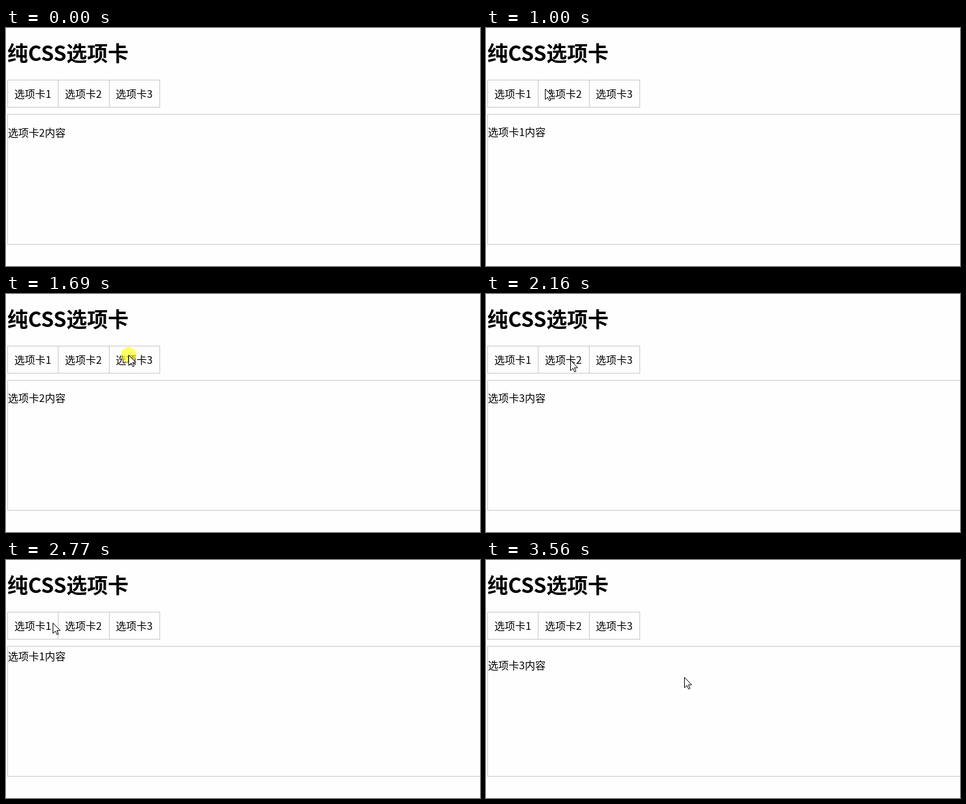
Animation of 732 by 368 pixels, one loop 3.65 s. Source, as an HTML page:

```html
<!DOCTYPE html>
<html lang="zh-CN">
<head>
<meta charset="utf-8">
<title>纯CSS选项卡</title>
<style>
  html, body { margin: 0; width: 100%; height: 100%; overflow: hidden; background: #fefefe; }
  svg { display: block; width: 732px; height: 368px; }
  text { font: 16px "Noto Sans CJK SC", "Noto Sans CJK", sans-serif; fill: #000; }
  .title { font-size: 32px; font-weight: 700; }
  .line { fill: none; stroke: #c8c8c8; shape-rendering: crispEdges; }
  .glow { fill: #ff0; opacity: .6; }
  .arrow { fill: #fff; stroke: #000; stroke-linejoin: round; }
</style>
</head>
<body>
<svg viewBox="0 0 732 368">
  <defs>
    <clipPath id="view"><rect x="3" y="134" width="729" height="200"/></clipPath>
  </defs>
  <text class="title" x="2" y="51">纯CSS选项卡</text>
  <path class="line" d="M2.5 80.5H237.5V122.5H2.5ZM80.5 80V123M159.5 80V123"/>
  <text x="13" y="108">选项卡1</text>
  <text x="91" y="108">选项卡2</text>
  <text x="169.5" y="108">选项卡3</text>
  <path class="line" d="M733 133.5H2.5V334.5H733"/>
  <g clip-path="url(#view)">
    <g id="panels">
      <text x="3" y="167">选项卡1内容</text>
      <text x="3" y="367">选项卡2内容</text>
      <text x="3" y="567">选项卡3内容</text>
    </g>
  </g>
  <g id="cursor">
    <circle id="glow" class="glow" r="12"/>
    <path class="arrow" d="M.5 .5V16.5L4.3 13L6.8 18.5L9 17.5L6.6 12H11.7Z"/>
  </g>
</svg>
<script>
  const LOOP = 3650, STEP = 77.3, LAST = 46;
  const $ = id => document.getElementById(id);
  const panels = $('panels'), cursor = $('cursor'), glow = $('glow');

  // [start ms, from, to] of each smooth scroll
  const scrolls = [
    [735, 199, 0], [1291, 0, 200], [1755, 200, 400],
    [2295, 400, 200], [2587, 200, 0], [3240, 0, 400]
  ];
  // [ms, x, y] of the pointer tip
  const path = [
    [77, 482, 268], [464, 18, 76], [541, 37, 94], [773, 37, 94],
    [1005, 91, 94], [1160, 137, 94], [1314, 137, 94], [1546, 189, 94],
    [1778, 189, 94], [2164, 130, 102], [2319, 130, 102], [2551, 42, 96],
    [2706, 42, 96], [3092, 193, 99], [3247, 193, 99], [3556, 306, 181]
  ];
  // [first step, end step) of each press
  const presses = [[8, 10], [16, 17], [22, 23], [29, 30], [33, 34], [41, 42]];

  const mix = (a, b, k) => a + (b - a) * k;

  // cubic-bezier(.42, 0, .58, 1)
  function easeInOut(x) {
    let lo = 0, hi = 1;
    for (let i = 0; i < 20; i++) {
      const s = (lo + hi) / 2, r = 1 - s;
      if (1.26 * s * r * r + 1.74 * s * s * r + s * s * s < x) lo = s; else hi = s;
    }
    return lo * lo * (3 - 2 * lo);
  }

  function scrollAt(t) {
    let y = scrolls[0][1];
    for (const [start, from, to] of scrolls) {
      if (t < start) break;
      // the duration grows with the root of the distance
      const span = Math.sqrt(Math.abs(to - from)) / 60 * 1000;
      const k = (t - start) / span;
      y = k >= 1 ? to : mix(from, to, easeInOut(k));
    }
    return Math.round(y);
  }

  function tipAt(t) {
    const n = path.findIndex(p => p[0] >= t);
    if (n < 0) return path[path.length - 1].slice(1);
    if (n === 0) return path[0].slice(1);
    const a = path[n - 1], b = path[n];
    const k = (t - a[0]) / (b[0] - a[0]);
    return [1, 2].map(i => Math.round(mix(a[i], b[i], k)));
  }

  function draw(ms) {
    const step = Math.min(LAST, Math.floor((ms % LOOP + 17) / STEP));
    const t = step * STEP;
    const pressed = presses.some(([a, b]) => step >= a && step < b);
    panels.setAttribute('transform', `translate(0 ${-scrollAt(t)})`);
    cursor.setAttribute('transform', `translate(${tipAt(t).join(' ')})`);
    cursor.setAttribute('visibility', step ? 'visible' : 'hidden');
    glow.setAttribute('display', pressed ? 'inline' : 'none');
  }

  const begin = performance.now();
  function tick() {
    draw(performance.now() - begin);
    requestAnimationFrame(tick);
  }
  tick();
</script>
</body>
</html>
```
